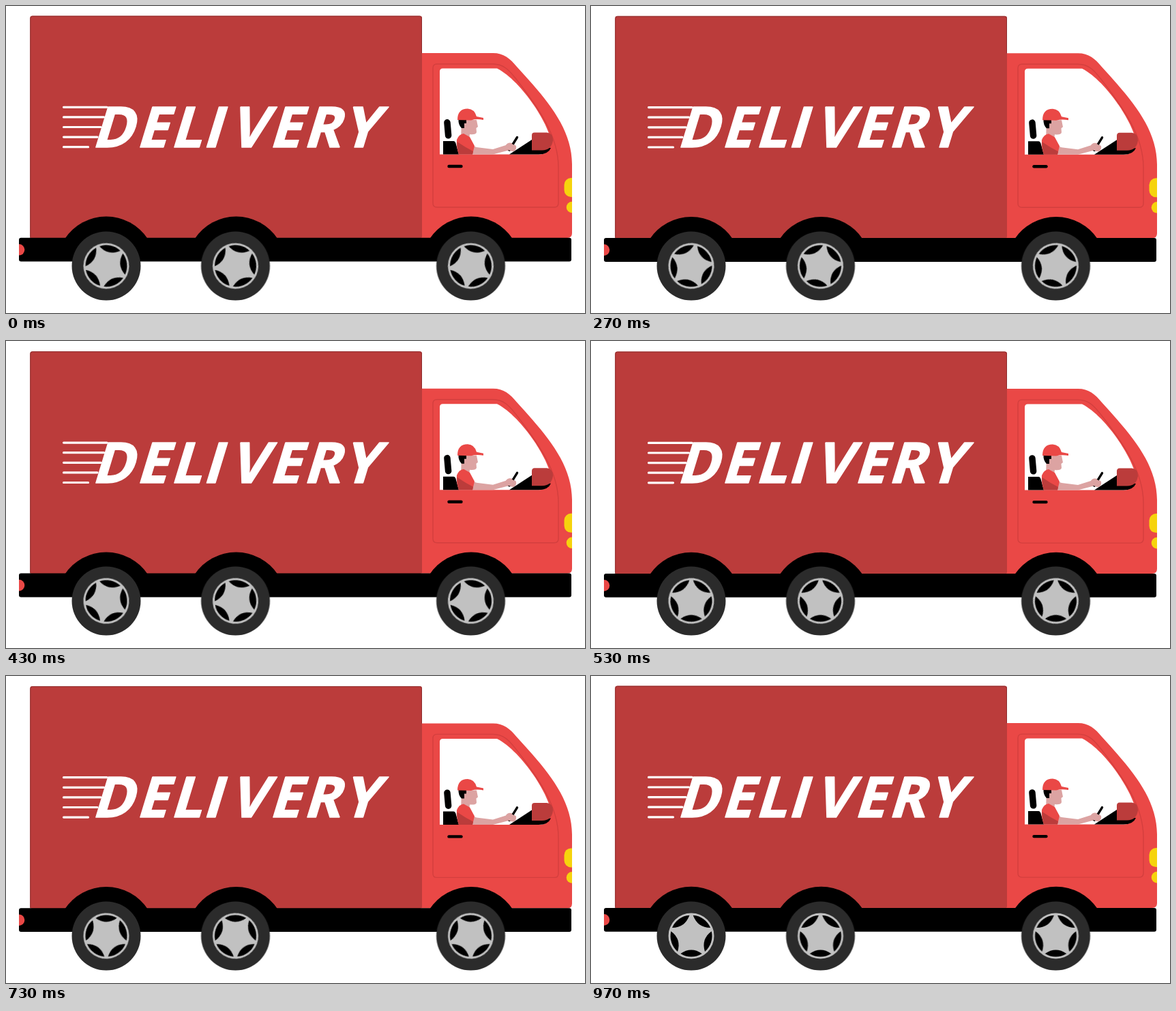
Recreate the animation shown at these times as an HTML page. Size 849 px wide and 450 px high, loop 1.01 s.

```html
<!DOCTYPE html>
<html lang="en">
<head>
<meta charset="utf-8">
<title>Delivery truck</title>
<style>
  html, body { margin: 0; width: 100%; height: 100%; overflow: hidden; background: #fff; }
  svg { display: block; width: 100vw; height: 100vh; }
  .red { fill: #ea4846; }
  .dark { fill: #bb3c3b; }
  .skin { fill: #dca3a2; }
  .lamp { fill: #f6d30d; }
  .label { font: 700 82.5px "Open Sans", Lato, sans-serif; fill: #fff; stroke: #fff; stroke-width: 1.5; stroke-linejoin: round; }
  .speed { fill: none; stroke: #fff; stroke-width: 3.2; stroke-linecap: round; }
  .seam { fill: none; stroke: #d33f3e; stroke-width: 1.4; }
  .body { animation: bob 1010ms -3.4ms infinite ease-in-out; }
  .rim { animation: spin 1010ms -3.4ms infinite; }
  @keyframes bob {
    0%, 33%, 66%, 100% { transform: translateY(0); }
    16.5%, 49.5%, 82.5% { transform: translateY(1.2px); }
  }
  /* thirty poses per turn, the last one held slightly longer */
  @keyframes spin {
    0% { transform: rotate(0deg); animation-timing-function: steps(30, end); }
    99.0099% { transform: rotate(360deg); animation-timing-function: step-end; }
    99.01%, 100% { transform: rotate(348deg); }
  }
</style>
</head>
<body>
<svg viewBox="0 0 849 450" preserveAspectRatio="none">
  <defs>
    <clipPath id="ends"><rect x="19" y="0" width="811" height="450"/></clipPath>
    <path id="arch" d="M-61 341.5A73 73 0 0 1 61 341.5Z"/>
    <path id="hole" d="M-15.7 -26.1A30.5 30.5 0 0 1 15.7 -26.1Q0 -15 -15.7 -26.1Z"/>
    <g id="wheel">
      <circle r="50.5" fill="#2b2b2b"/>
      <g class="rim">
        <circle r="33.5" fill="#c1c1c1"/>
        <use href="#hole"/>
        <use href="#hole" transform="rotate(72)"/>
        <use href="#hole" transform="rotate(144)"/>
        <use href="#hole" transform="rotate(216)"/>
        <use href="#hole" transform="rotate(288)"/>
      </g>
    </g>
  </defs>

  <g clip-path="url(#ends)">
    <g class="body">
      <path class="red" d="M609 69H714C730 69 739 77 749 89C791 135 830 178 830 232V333Q830 340 823 340H609Z"/>
      <rect class="dark" x="35.3" y="14.5" width="574.7" height="326" rx="3"/>
      <path d="M35.8 340V18Q35.8 15 38.8 15H606.5Q609.5 15 609.5 18V69" fill="none" stroke="#8e2c2c"/>

      <rect x="19" y="339.8" width="810" height="34.8" rx="3"/>
      <circle class="red" cx="19" cy="357.3" r="8.3"/>

      <path class="speed" d="M84.5 148.3H148M84.5 162.9H143.5M84.5 177.5H139M84.5 192.1H134M84.5 206.7H120.5"/>
      <text class="label" transform="translate(0 207) skewX(-17)" x="124.5 189.5 239.5 287 326 384.5 434.5 491.5" y="0">DELIVERY</text>

      <path class="seam" d="M626 91Q626 85 632 85H714C731 85 739 96 748 107C780 148 810 190 810 236V289Q810 295 804 295H632Q626 295 626 289Z"/>
      <path fill="#fff" d="M636 96Q636 91.5 640.5 91.5H720C751 107 788 160 797 190L798 204Q795 217.5 782 217.5H636Z"/>

      <!-- seat and dashboard -->
      <rect x="643" y="166" width="9.5" height="28.5" rx="4.7" transform="rotate(-5 648 180)"/>
      <path d="M641 198H656Q659 198 660 203L664 217.5H641Z"/>
      <path d="M738 217.5L771 196V208H799Q795 217.5 781 217.5Z"/>

      <!-- driver -->
      <path class="skin" d="M668 167H690L692 177L689.5 179L690 185Q689 189 680 188L679 196H667Z"/>
      <path d="M663.5 166H675V172H672V179H668Q663 174 663.5 166Z"/>
      <path class="red" d="M662 167Q662 150.5 677 150.5Q687 151 690 162L700 164V167Q690 165 682 167.5Z"/>
      <path class="skin" d="M682 204L690 207L714 210L733 204Q736 199 742 201L748 205Q749 211 744 213L735 212L714 217.5H684Z"/>
      <path class="red" d="M661 196Q664 188 671 187L680 192L687 205L684 217.5H664Q660 207 661 196Z"/>
      <path class="dark" d="M661.5 199L674 207L685 213L684 217.5H664Q661 208 661.5 199Z"/>
      <path d="M738 211L749.5 192.5" fill="none" stroke="#000" stroke-width="3.4" stroke-linecap="round"/>
      <path class="skin" d="M733 204Q737 199 742 202L747 205Q749 211 744 213L736 211Z"/>

      <path class="dark" d="M775 185.5H793Q802 186 802 197Q800 211.5 786 211.5H771V189.5Q771 185.5 775 185.5Z"/>
      <path d="M649.5 235H667.5" stroke="#000" stroke-width="4.4" stroke-linecap="round"/>

      <rect class="lamp" x="818.5" y="252" width="24" height="28" rx="10"/>
      <circle class="lamp" cx="830" cy="295" r="8.3"/>

      <use href="#arch" x="147"/>
      <use href="#arch" x="337.5"/>
      <use href="#arch" x="682"/>
    </g>
    <use href="#wheel" x="147" y="381"/>
    <use href="#wheel" x="336.5" y="381"/>
    <use href="#wheel" x="681.5" y="381"/>
  </g>
</svg>
</body>
</html>
```
